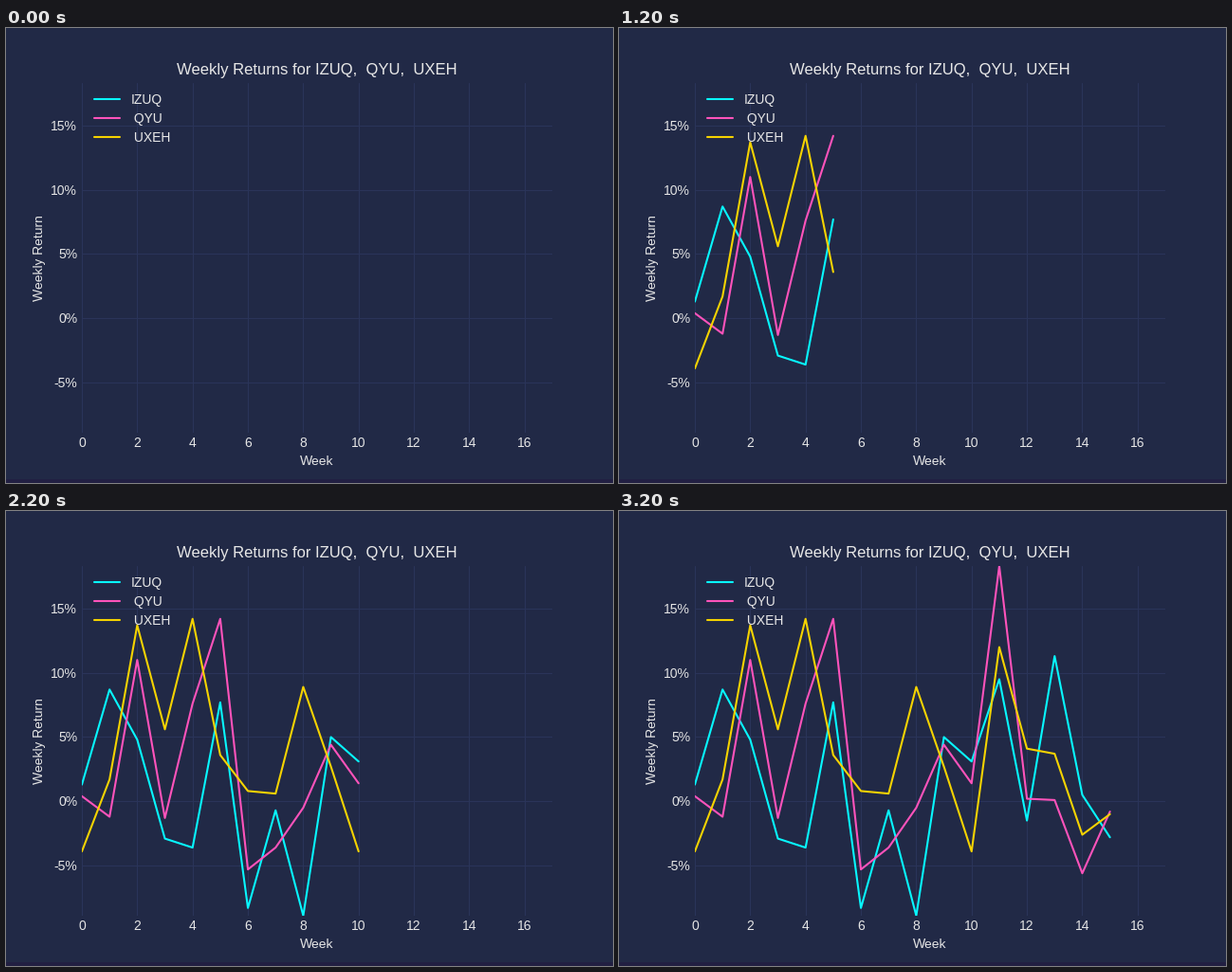
Write a matplotlib script that moves like this. It is 640 px wide and 480 px high and loops after 3400 ms.

```python
import matplotlib.pyplot as plt
from matplotlib.animation import FuncAnimation
from matplotlib.patches import Rectangle

BG, GRID, TEXT = "#212946", "#2A3459", "0.9"
plt.rcParams.update({
    "font.family": "Liberation Sans",
    "font.size": 10,
    "text.hinting": "default",
    "text.color": TEXT,
    "axes.labelcolor": TEXT,
    "xtick.color": TEXT,
    "ytick.color": TEXT,
    "axes.axisbelow": True,
    "axes.unicode_minus": False,
    "lines.solid_capstyle": "round",
})

# Weekly returns in percent: the corner points of each line
RETURNS = {
    "IZUQ": [1.3, 8.7, 4.8, -2.9, -3.6, 7.7, -8.3, -0.7,
             -8.9, 5.0, 3.1, 9.5, -1.5, 11.3, 0.5, -2.8],
    " QYU": [0.4, -1.2, 11, -1.3, 7.6, 14.2, -5.3, -3.6,
             -0.5, 4.4, 1.4, 18.3, 0.2, 0.1, -5.6, -0.8],
    " UXEH": [-3.9, 1.7, 13.7, 5.6, 14.2, 3.6, 0.8, 0.6,
              8.9, 2.7, -3.9, 12, 4.1, 3.7, -2.6, -1],
}
COLORS = ["#08F7FE", "#FE53BB", "#F5D300"]
WEEKS = 17

fig, ax = plt.subplots(figsize=(6.4, 4.8), dpi=100, facecolor=BG)
fig.subplots_adjust(left=0.125, right=0.9, bottom=0.11, top=0.88)
fig.add_artist(Rectangle((0, 0), 1, 4 / 480, transform=fig.transFigure,
                         facecolor="#211F42", edgecolor="none"))

ax.set_facecolor(BG)
ax.set_xlim(0, WEEKS)
ax.set_ylim(-8.92, 18.34)
ax.set_xticks(range(0, WEEKS, 2))
ax.set_yticks(range(-5, 16, 5))
ax.yaxis.set_major_formatter(lambda v, pos: f"{v:.0f}%")
ax.tick_params(length=0)
ax.grid(color=GRID, linewidth=0.8)
ax.spines[:].set_visible(False)

ax.set_title("Weekly Returns for " + ", ".join(RETURNS), fontsize=12)
ax.set_xlabel("Week")
ax.set_ylabel("Weekly Return")

lines = [ax.plot([], [], color=color, linewidth=1.5, label=name)[0]
         for name, color in zip(RETURNS, COLORS)]
ax.legend(loc="upper left", frameon=False)


def draw(count):
    """Show the first `count` weeks of every line."""
    for line, values in zip(lines, RETURNS.values()):
        line.set_data(range(count), values[:count])
    return lines


anim = FuncAnimation(fig, draw, frames=WEEKS, interval=200,
                     init_func=lambda: draw(0), repeat=True)
plt.show()
```
